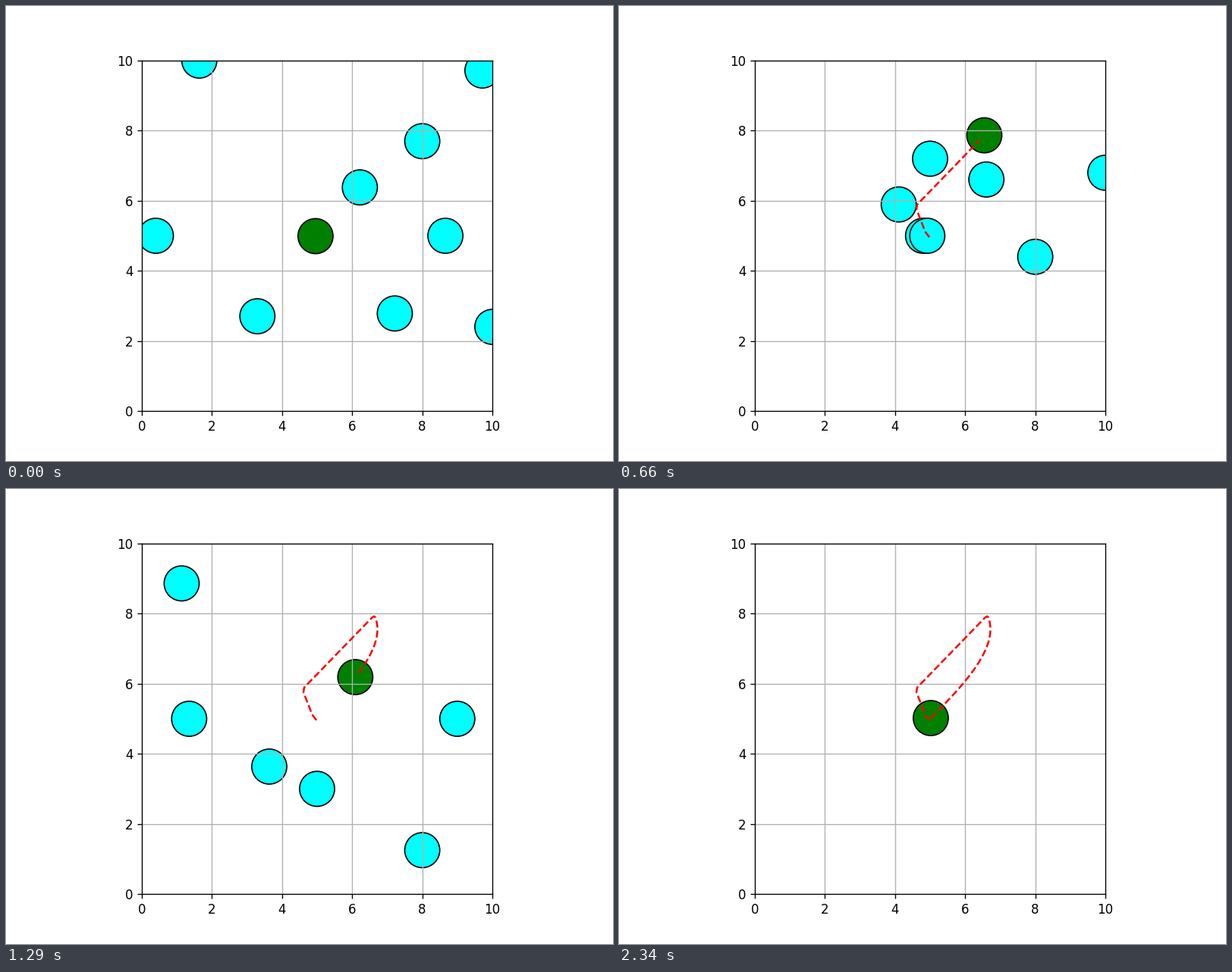
A matplotlib script that plays this animation: 800 by 600 pixels, repeating every 2370 ms.

```python
import numpy as np
import matplotlib.pyplot as plt
from matplotlib.animation import FuncAnimation
from matplotlib.patches import Circle

FRAMES = 79
INTERVAL = 30
DPI = 120
RADIUS = 0.5
TURN, ARRIVE = 24, 59  # steps at which the robot turns back and stops

# start x, start y, speed per step, heading in degrees
OBSTACLES = [
    (5, 12, 0.20, -90),
    (0, 5, 0.20, 0),
    (10, 2, 0.20, 90),
    (7.5, 2.5, 0.20, 135),
    (9, 5, 0.17, 180),
    (10, 10, 0.20, -135),
    (8, 8, 0.15, -90),
    (3, 3, 0.21, -45),
    (6, 6, 0.22, 60),
    (2, 10, 0.18, 180),
]

# way out: step, x, y of the corners
AWAY = np.array([
    (-1, 4.985, 4.965), (0, 4.955, 4.99), (2, 4.86, 5.12), (7, 4.61, 5.76),
    (8, 4.63, 5.89), (22, 6.547, 7.867), (23, 6.62, 7.925),
])
# way home: control points of a cubic curve
HOME = np.array([(6.66, 7.9), (6.96, 7.1), (6.12, 6.12), (5.02, 5.02)])


def bezier(points, t):
    a, b, c, d = points[:, :, None]
    s = 1 - t
    return a * s**3 + 3 * b * s**2 * t + 3 * c * s * t**2 + d * t**3


def even_speed(curve, share):
    """Points of a curve at the given shares of its length."""
    gaps = np.hypot(*np.diff(curve))
    length = np.concatenate([[0], np.cumsum(gaps)])
    return np.array([np.interp(share, length / length[-1], axis)
                     for axis in curve])


def robot_route():
    out = np.arange(-1, TURN)
    away = [np.interp(out, AWAY[:, 0], AWAY[:, k]) for k in (1, 2)]
    back = np.arange(TURN, FRAMES)
    share = np.clip((back - TURN) / (ARRIVE - TURN), 0, 1)
    home = even_speed(bezier(HOME, np.linspace(0, 1, 400)), share)
    return np.hstack([away, home])


def obstacle_at(spec, step):
    x, y, speed, heading = spec
    reach = speed * (step + 2)
    angle = np.radians(heading)
    return x + reach * np.cos(angle), y + reach * np.sin(angle)


fig = plt.figure(figsize=(800 / DPI, 600 / DPI), dpi=DPI)
ax = fig.add_subplot(111, autoscale_on=False, xlim=(0, 10), ylim=(0, 10))
ax.set_aspect("equal")
ax.grid()


def add_disc(color):
    return ax.add_patch(Circle((0, 0), RADIUS, facecolor=color,
                               edgecolor="black"))


route = robot_route()
robot = add_disc("green")
discs = [add_disc("cyan") for _ in OBSTACLES]
trail, = ax.plot([], [], "--r")


def draw(step):
    # the route begins one step early and the trail ends one step behind
    robot.center = route[:, step + 1]
    trail.set_data(*route[:, :step + 1])
    for disc, spec in zip(discs, OBSTACLES):
        disc.center = obstacle_at(spec, step)
    return [robot, trail, *discs]


anim = FuncAnimation(fig, draw, frames=FRAMES, interval=INTERVAL,
                     init_func=lambda: draw(0), repeat=True, repeat_delay=0)
plt.show()
```
